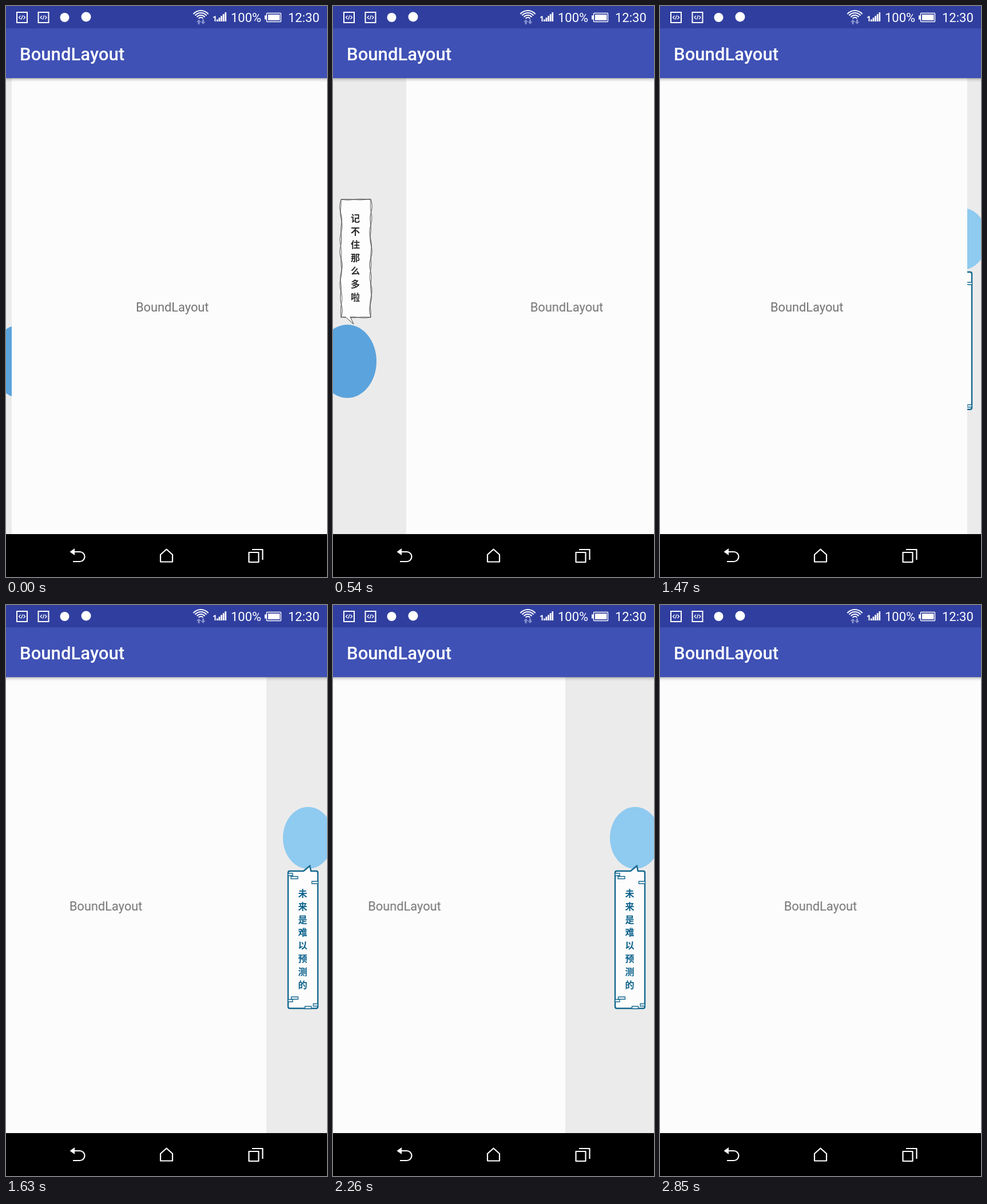
An HTML page that plays this animation: 561 px wide and 998 px high, repeating every 2.87 s.

```html
<!DOCTYPE html>
<html lang="zh-CN">
<head>
<meta charset="utf-8">
<title>BoundLayout</title>
<style>
  html, body { margin: 0; width: 100%; height: 100%; overflow: hidden; background: #000; }
  svg { display: block; font-family: Roboto, sans-serif; }
  .sheet { animation: drag 2870ms infinite; }
  .bubble { font: 700 16px "Noto Sans CJK SC", "Noto Sans CJK", sans-serif; text-anchor: middle; }
  .line { fill: none; stroke: #fff; stroke-width: 2.2; }
  @keyframes drag {
    0%      { transform: translateX(10px); animation-timing-function: cubic-bezier(.3, .3, .65, .82); }
    18.815% { transform: translateX(128px); }
    30.94%  { transform: translateX(128px); animation-timing-function: cubic-bezier(.13, .1, .05, 1); }
    48.78%  { transform: translateX(0); }
    49.756% { transform: translateX(0); animation-timing-function: cubic-bezier(.22, .38, .42, 1); }
    68.293% { transform: translateX(-159.5px); }
    78.397% { transform: translateX(-159.5px); animation-timing-function: cubic-bezier(.13, .1, .05, 1); }
    96.864%, 100% { transform: translateX(0); }
  }
</style>
</head>
<body>
<svg width="561" height="998" viewBox="0 0 561 998">
  <defs>
    <linearGradient id="shade" x2="0" y2="1">
      <stop stop-color="#000" stop-opacity=".3"/>
      <stop offset=".4" stop-color="#000" stop-opacity=".1"/>
      <stop offset="1" stop-color="#000" stop-opacity="0"/>
    </linearGradient>
    <g id="code">
      <rect x="1" y="1" width="18" height="18" class="line" style="stroke-width:2"/>
      <path class="line" style="stroke-width:1.3" d="M7.5 7L4.5 10l3 3M12.5 7l3 3-3 3M11 6.5l-2 7"/>
    </g>
  </defs>

  <rect width="561" height="998" fill="#ebebeb"/>

  <!-- left panel -->
  <ellipse cx="25" cy="621" rx="51" ry="64" fill="#5ba3dc"/>
  <g id="left" class="bubble" fill="#2b2b2b"></g>

  <!-- right panel -->
  <ellipse cx="528" cy="407" rx="44" ry="54" fill="#8fcaf0"/>
  <g id="right" class="bubble" fill="#0c628d">
    <path d="M496 465H520L531 456 533 465H542Q545 465 545 468V702Q545 705 542 705H496Q493 705 493 702V468Q493 465 496 465Z"
      fill="#fcfcfc" stroke="#12678f" stroke-width="2.4"/>
    <path d="M493 469h8v4h-8zM498 474.500h12v4h-12zM534.500 483h11v4h-11zM498.500 685h12v4h-12zM493 689.500h8v4h-8zM537 697h8v4h-8zM522.500 701.500h11v4h-11z"
      fill="#fcfcfc" stroke="#12678f" stroke-width="1.300"/>
  </g>

  <g class="sheet">
    <rect y="126" width="561" height="797" fill="#fcfcfd"/>
    <text x="280.5" y="533.500" font-size="21.8" text-anchor="middle" fill="#737373">BoundLayout</text>
  </g>

  <!-- app bar -->
  <rect y="126" width="561" height="7" fill="url(#shade)"/>
  <rect y="39" width="561" height="87" fill="#3f51b5"/>
  <rect width="561" height="39" fill="#303f9f"/>
  <text x="24" y="94.500" font-size="31.1" font-weight="500" fill="#fff">BoundLayout</text>

  <!-- status bar -->
  <use href="#code" x="18" y="10"/>
  <use href="#code" x="55.500" y="10"/>
  <g fill="#fff">
    <circle cx="102.500" cy="20" r="8"/>
    <circle cx="140" cy="19" r="8.500"/>
    <g id="wifi"></g>
    <path fill="#8791cf" d="M333 28l4-4.500 4 4.500h-2.500v4h-3v-4zM340.500 27.500h2.500v-4h3v4h2.500l-4 4.500z"/>
    <path d="M362 19.500l3-2h1.500V27h-2v-7l-2.500 1z"/>
    <g id="signal"></g>
    <text x="393" y="28" font-size="22">100%</text>
    <rect x="455.500" y="12.500" width="25" height="15" rx="1" class="line" style="stroke-width:1.4"/>
    <path d="M458 15h20.500v10H458zM452 16.500h3v7h-3z"/>
    <text x="493" y="28" font-size="22">12:30</text>
  </g>

  <!-- navigation bar -->
  <rect y="923" width="561" height="75" fill="#000"/>
  <path d="M111.500 954l8.500-6v12z" fill="#fff"/>
  <g class="line" stroke-linejoin="round">
    <path d="M117 954H129A8.500 8.500 0 0 1 129 971H117"/>
    <path d="M270 971.500V959L280.500 949.500 291 959V971.500Z"/>
    <path d="M424.500 955H441.500V972H424.500ZM430 950H448.500V968"/>
  </g>
</svg>
<script>
  const add = (id, markup) => document.getElementById(id).insertAdjacentHTML('beforeend', markup);
  const range = n => [...Array(n).keys()];

  const column = (id, text, x, y, step) => add(id, [...text].map((c, i) =>
    `<text x="${x}" y="${y + i * step}" dy=".37em">${c}</text>`).join(''));

  // Hand-drawn frame: rectangle edges pushed sideways by two sine waves.
  function scribble(phase) {
    const [l, t, r, b] = [14, 338, 66, 544];
    const wob = s => 1.5 * Math.sin(s / 6.5 + phase) + 1.3 * Math.sin(s / 11 + phase * 2.3);
    const edge = (len, place) => range(Math.ceil(len / 3)).map(i => place(i * 3, wob(i * 3)));
    const w = r - l, h = b - t;
    const pts = [
      ...edge(w, (s, d) => [l + s, t + d * .4]),
      ...edge(h, (s, d) => [r + d * .8, t + s]),
      ...edge(w, (s, d) => [r - s, b + d * .4]),
      ...edge(h, (s, d) => [l + d * .8, b - s])
    ];
    return 'M' + pts.map(p => p.map(v => v.toFixed(1)).join(' ')).join('L') + 'Z';
  }

  add('left', `<path d="${scribble(0)}" fill="#fdfdfd" stroke="#333" stroke-width=".9"/>
    <path d="${scribble(2.4)}" fill="none" stroke="#444" stroke-width=".8"/>
    <path d="M21 543L36 556 30 543" fill="#fdfdfd" stroke="#333" stroke-width=".9"/>`);
  column('left', '记不住那么多啦', 39, 371.5, 23);
  column('right', '未来是难以预测的', 518.5, 504, 22.8);

  add('wifi', [17, 13, 9, 5].map(r => {
    const x = r * .77, y = 25 - r * .64;
    return `<path class="line" style="stroke-width:2" d="M${340.5 - x} ${y}A${r} ${r} 0 0 1 ${340.5 + x} ${y}"/>`;
  }).join(''));
  add('signal', range(5).map(i => {
    const h = 3.5 + i * 3.1;
    return `<rect x="${368 + i * 3.6}" y="${27 - h}" width="2.7" height="${h}"/>`;
  }).join(''));
</script>
</body>
</html>
```
